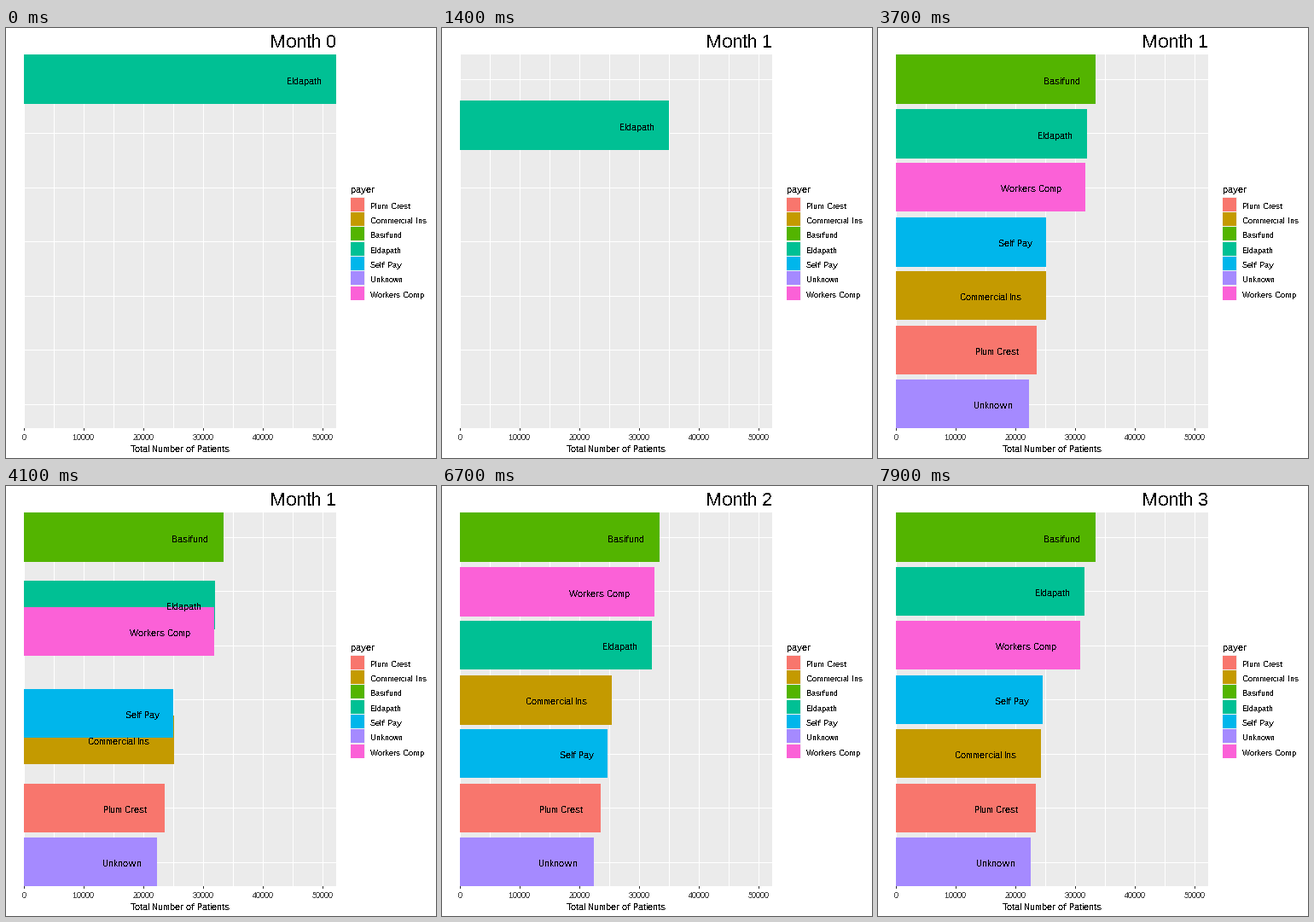
A matplotlib script that plays this animation: 504 px wide and 504 px high, repeating every 8 s.

```python
import math

import matplotlib.pyplot as plt
from matplotlib.animation import FuncAnimation
from matplotlib.patches import Rectangle

plt.rcParams.update({
    "font.family": "Liberation Sans",
    "text.antialiased": False,
    "text.hinting": "native",
    "text.hinting_factor": 1,
    "animation.embed_limit": 50,
})

SIZE = 504
LEFT, RIGHT, TOP, BOTTOM = 21, 387, 31, 469
PX_PER_PATIENT = 70 / 10000
ROW0, PITCH = 60.0, 63.45
BAR_H = 0.9 * PITCH
STEPS = 15                 # frames per transition
STARTS = (4, 35, 65)       # last resting frame before each transition
KEY_PITCH = 17.28

COLORS = {
    "Plum Crest": "#F8766D",
    "Commercial Ins": "#C49A00",
    "Basifund": "#53B400",
    "Eldapath": "#00C094",
    "Self Pay": "#00B6EB",
    "Unknown": "#A58AFF",
    "Workers Comp": "#FB61D7",
}

# Patients per payer for each month, in ranked order
MONTHS = [
    {"Eldapath": 52286},
    {"Basifund": 33400, "Eldapath": 32000, "Workers Comp": 31700,
     "Self Pay": 25150, "Commercial Ins": 25100, "Plum Crest": 23550,
     "Unknown": 22300},
    {"Basifund": 33400, "Workers Comp": 32550, "Eldapath": 32100,
     "Commercial Ins": 25400, "Self Pay": 24700, "Plum Crest": 23550,
     "Unknown": 22400},
    {"Basifund": 33400, "Eldapath": 31550, "Workers Comp": 30900,
     "Self Pay": 24550, "Commercial Ins": 24300, "Plum Crest": 23400,
     "Unknown": 22600},
]
STATES = [{name: (rank, n) for rank, (name, n) in enumerate(m.items())}
          for m in MONTHS]


def px(v):
    return math.floor(v + 0.5)


def ease(p):
    return 4 * p ** 3 if p < 0.5 else 1 - 4 * (1 - p) ** 3


fig = plt.figure(figsize=(SIZE / 72, SIZE / 72), dpi=72, facecolor="white")
ax = fig.add_axes([0, 0, 1, 1])
ax.set_xlim(0, SIZE)
ax.set_ylim(SIZE, 0)
ax.axis("off")


def box(x0, y0, x1, y1, color, z=1):
    r = Rectangle((x0, y0), x1 - x0, y1 - y0, facecolor=color, linewidth=0,
                  antialiased=False, zorder=z)
    return ax.add_patch(r)


def label(x, y, s, size, color="black", ha="left", z=5):
    return ax.text(x, y, s, fontsize=size, color=color, ha=ha,
                   va="baseline", zorder=z)


def draw_panel():
    box(LEFT, TOP, RIGHT, BOTTOM, "#EBEBEB", 0)
    for k in range(11):
        x = LEFT + 35 * k
        box(x, TOP, x + 1, BOTTOM, "white")
        if k % 2 == 0:
            box(x, BOTTOM, x + 1, BOTTOM + 3, "#333333")
            label(x, 483, str(5000 * k), 9, "#4D4D4D", "center")
    for k in range(7):
        y = px(ROW0 + PITCH * k)
        box(LEFT, y, RIGHT, y + 1, "white")
    label((LEFT + RIGHT) / 2, 497, "Total Number of Patients", 11,
          ha="center")


def draw_legend():
    label(404, 193, "payer", 11)
    box(404, 198, 421, 319, "#F2F2F2", 0)
    for k, (name, color) in enumerate(COLORS.items()):
        y = px(198.9 + KEY_PITCH * k)
        box(404, y, 420, y + 16, color)
        label(427, px(211.9 + KEY_PITCH * k), name, 9)


draw_panel()
draw_legend()
title = label(RIGHT, 23, "Month 0", 22, ha="right")

bars, tags, widths = {}, {}, {}
renderer = fig.canvas.get_renderer()
for i, (name, color) in enumerate(COLORS.items()):
    bars[name] = box(LEFT, TOP, LEFT, TOP, color, 2 + i * 0.1)
    tags[name] = label(0, 0, name, 11, ha="right")
    widths[name] = tags[name].get_window_extent(renderer).width


def blend(a, b, p):
    return tuple(u + (v - u) * p for u, v in zip(a, b))


def pose(frame):
    """Return the month to show and each visible payer's (rank, patients)."""
    month = sum(frame >= s + STEPS for s in STARTS)
    if month == len(STARTS) or frame <= STARTS[month]:
        return month, STATES[month]
    p = (frame - STARTS[month]) / STEPS
    old, new = STATES[month], STATES[month + 1]
    now = {k: blend(old[k], new[k], ease(p)) for k in old}
    return month + (p >= 0.5), now


def update(frame):
    month, now = pose(frame)
    title.set_text(f"Month {month}")
    for name in COLORS:
        shown = name in now
        bars[name].set_visible(shown)
        tags[name].set_visible(shown)
        if not shown:
            continue
        rank, n = now[name]
        mid = ROW0 + PITCH * rank
        end = LEFT + n * PX_PER_PATIENT
        y0, y1 = px(mid - BAR_H / 2), px(mid + BAR_H / 2)
        bars[name].set_bounds(LEFT, y0, px(end) - LEFT, y1 - y0)
        tags[name].set_position((end - 0.4 * widths[name], px(mid + 5.5)))
    return [title, *bars.values(), *tags.values()]


anim = FuncAnimation(fig, update, frames=80, interval=100, repeat=True,
                     repeat_delay=0, blit=False)
plt.show()
```
